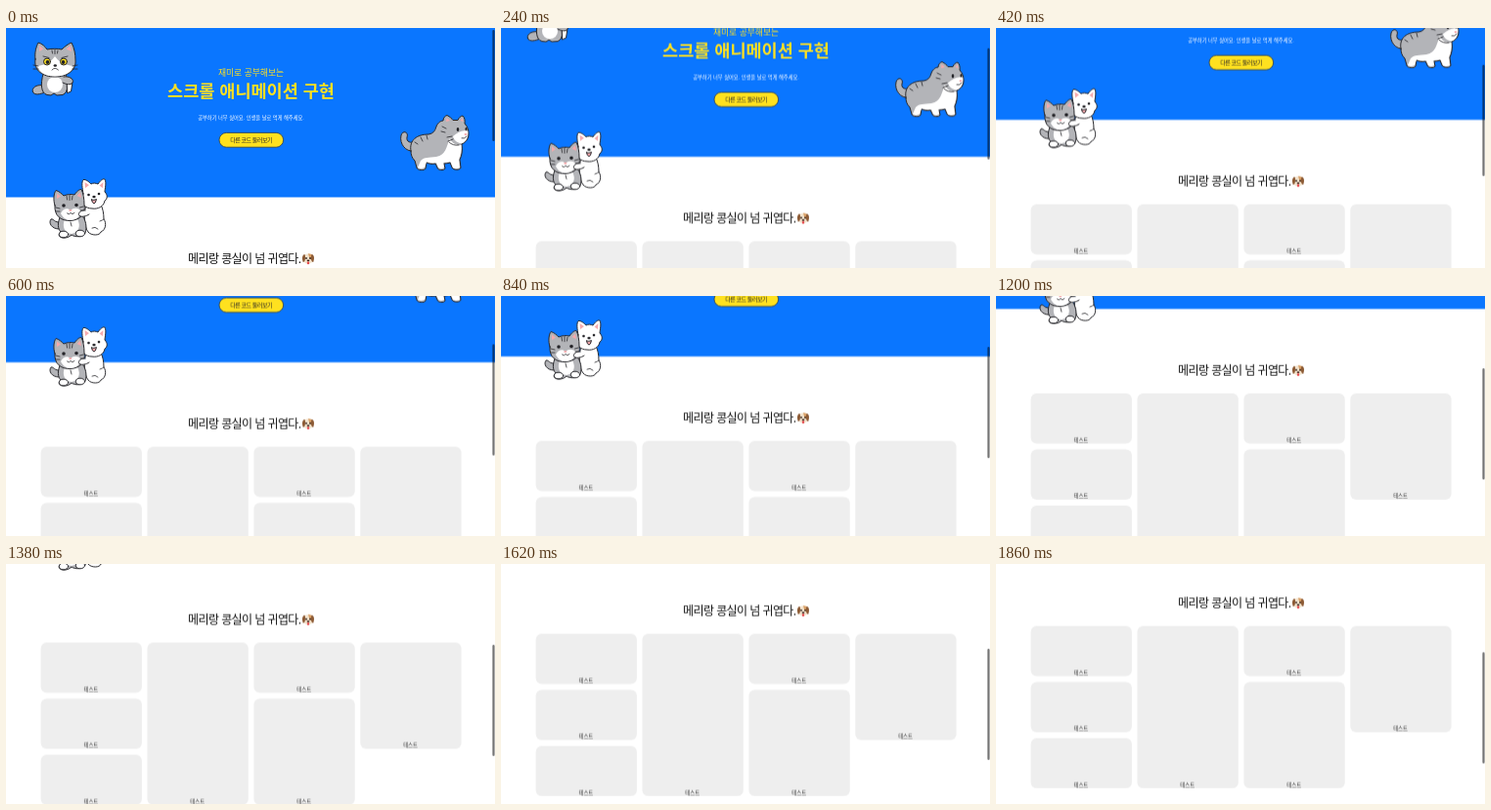
Recreate the animation shown at these times as an HTML page. Size 500 by 246 pixels, loop 2.04 s.

```html
<!DOCTYPE html>
<html lang="ko">
<head>
<meta charset="utf-8">
<title>스크롤 애니메이션 구현</title>
<style>
  html, body { margin: 0; width: 100%; height: 100%; overflow: hidden; background: #fff; }
  svg { display: block; }
  text { font-family: "Noto Sans CJK KR", "Noto Sans CJK", "Noto Sans CJK JP", sans-serif; text-anchor: middle; }
  .ink { stroke: #27272b; stroke-width: 1; stroke-linejoin: round; stroke-linecap: round; }
  .line { fill: none; stroke-width: .8; }
  .gray { fill: #b3b4b8; }
  .dark { fill: #8f9197; }
  .white { fill: #fff; }
  .black { fill: #222226; }
  .pink { fill: #f5a9ad; }
  .yellow { fill: #ffe11f; }
</style>
</head>
<body>
<svg width="500" height="246" viewBox="0 0 500 246">
  <g id="page">
    <rect width="500" height="173.5" fill="#0a76ff"/>
    <text class="yellow" x="250.5" y="49.3" font-size="8.8" font-weight="500">재미로 공부해보는</text>
    <text class="yellow" x="250.5" y="70.8" font-size="17.5" font-weight="900">스크롤 애니메이션 구현</text>
    <text class="white" x="250.5" y="93.6" font-size="5.27" font-weight="500">공부하기 너무 싫어요. 인생을 날로 먹게 해주세요.</text>
    <rect class="yellow" x="218" y="107.4" width="65.6" height="14.8" rx="7.4" stroke="#2b3a4c" stroke-width=".8"/>
    <text class="black" x="250.6" y="117" font-size="6" font-weight="500" letter-spacing="-.46">다른 코드 둘러보기</text>

    <text fill="#111" x="243.8" y="240.6" font-size="12" font-weight="500" letter-spacing="-.6">메리랑 콩실이 넘 귀엽다.</text>
    <g id="puppy">
      <ellipse cx="309" cy="236.6" rx="5" ry="5.3" fill="#f3e3cd"/>
      <path d="M309 231.3C313 231 315 234 314 238C312 239 310 236 309 231.3Z" fill="#d9a066"/>
      <path d="M305.5 232C302.5 232.5 302.6 237 303.8 240C306 240 306.6 235 305.5 232ZM312.5 232C315.6 232.5 315.4 237 314.2 240C312 240 311.4 235 312.5 232Z" fill="#8c5a34"/>
      <circle cx="307" cy="236" r=".9" fill="#33221a"/>
      <circle cx="311" cy="236" r=".9" fill="#33221a"/>
      <ellipse cx="309" cy="238.3" rx="1.4" ry=".9" fill="#33221a"/>
      <ellipse cx="309" cy="240.8" rx="1.2" ry="1.5" fill="#e5484d"/>
    </g>
    <g id="cards"></g>
  </g>

  <g id="sulky">
    <path class="ink gray" d="M39 59C31 57 25 62 28 66.500C32 70 37 66 42 66Z"/>
    <path class="ink gray" d="M38 47C35 58 36 67 42 68.500L46 69L49 67L52 69L58 68.500C64 66 64 56 61 47Z"/>
    <ellipse class="white" cx="50" cy="58" rx="8" ry="8"/>
    <path class="ink white" d="M62.500 56L68 55L66.500 65L63 66.500Z"/>
    <path class="ink gray" d="M59 50C64 49 70 52 68 56C66 59 61 57.500 58 56"/>
    <path class="ink gray" d="M30 32C29 25 31 19 33 15C37 16 40 19 42 22C47 21 53 21 57 22C60 19 64 16 67 15C70 21 71 27 71 33C72 44 62 50 50 50C38 50 28 44 30 32Z"/>
    <path class="white" d="M32 39C40 38 46 35 50 29C54 35 60 38 69 39C66 47 58 49.400 50 49.400C42 49.400 35 47 32 39Z"/>
    <path class="pink" d="M34 18L34 24L38.500 21.500ZM66 18L67 24L61.500 21.500Z"/>
    <path class="ink line" d="M47 23L47.500 26M50 22.500V26.500M53 23L52.500 26M38 29L44 30.500M63 29L57 30.500M47 43Q50 39.500 53.500 43M28 38L33 39M28 42L33 42M73 38L68 39M73 42L68 42"/>
    <circle class="ink yellow" cx="42" cy="34.500" r="3.500"/>
    <circle class="ink yellow" cx="59" cy="34.500" r="3.500"/>
    <circle class="black" cx="42.500" cy="35" r="1.900"/>
    <circle class="black" cx="58.500" cy="35" r="1.900"/>
    <ellipse class="black" cx="50.300" cy="38.500" rx="1.700" ry="1.200"/>
  </g>

  <g id="walker">
    <path class="ink gray" d="M416 126C409 127 402 119 404 110C406 104 412 107 410 112C409 117 414 118 418 117Z"/>
    <path class="ink gray" d="M414 126C412 115 420 109 432 109C438 108 439 104 440 101C441 98 444 95 447 95C447 92 449 90 451 89.500C454 91 456 93 457 94.500L462 94.500C463 92 465 90 467 90C469 92 469.500 95 469 98C472 101 473 105 473 108C473.500 114 469 118 466 119C467 126 466 131 464 135L465 143C465 146 457 146 456 143L454 138C451 139 449 139 448 139L449 144C448 146.500 441 146 441 143L439 139C435 140 432 139 430 138L429 144C428 146.500 420 146 420 143L418 136C415 133 414 130 414 126Z"/>
    <path class="white" d="M465.500 120C460 121 455 117 454 113C450 122 450 130 440 132C432 133 428 132 424 136L421 143Q424 145 428 143L430 137Q435 139 440 138L442 143Q445 145 448 143L447 138L454.500 137L457 143Q460 145 464 143L463 135C465 130 466 125 465.500 120Z"/>
    <path class="white" d="M472.300 106C467 104 462 107 457 111C458 116 463 118.500 466 118C470 117 472.500 112 472.300 106Z"/>
    <path class="pink" d="M450.500 92L450 96L454 95ZM466.500 92L464.500 95L467.500 96Z"/>
    <path class="ink line" d="M430 110L431 114M424 112L426 116M418 117L421 119M446 101L450 103M445 106L449 107M466 113Q469 114 471 111M456 111L451 112M457 114L452 116M463 120Q457 121 453 117"/>
    <ellipse class="black" cx="462" cy="104" rx="1.300" ry="1.900"/>
    <ellipse class="black" cx="470.500" cy="103.500" rx="1" ry="1.700"/>
    <ellipse class="pink" cx="470" cy="109" rx="1.500" ry="1"/>
  </g>

  <g id="duo">
    <path class="ink white" d="M82 181C79 192 80 204 84 209C87 213 96 213 97 209C102 207 103 200 100 196C100 190 99 185 97 181Z"/>
    <path class="ink white" d="M79 170C78 164 77 158 79 155.500C82 155 85 158 87 160C89 158.500 92 159 94 160C96 157 99 154 101 155C103 159 101 165 101 168C104 171 104 175 101 177C100 183 94 186 88 185C81 185 77 180 78 176C75 174 76 171 79 170Z"/>
    <path class="pink" d="M80.500 158L81 164L85 161ZM99.500 158L95.500 161.500L99 164Z"/>
    <circle class="black" cx="84.500" cy="171" r="1.300"/>
    <circle class="black" cx="95" cy="170" r="1.300"/>
    <ellipse class="black" cx="90" cy="173" rx="1.700" ry="1.200"/>
    <path class="ink pink" stroke-width=".8" d="M87.500 176Q90 177 92.500 175.500Q91.500 180 90 180Q88 179.500 87.500 176Z"/>
    <path class="ink gray" d="M54 206C47 206 43 200 46 196C49 195 49 200 56 199Z"/>
    <path class="ink gray" d="M56 192C52 200 53 206 56 209C52 212 55 216 61 215C64 214.500 66 213 67 212C71 215 80 214 81 210C83 204 82 197 77 191Z"/>
    <path class="white" d="M60 196C57 204 60 210 67 211C74 210 77 203 73 196Z"/>
    <ellipse class="ink white" cx="59" cy="211.500" rx="4.600" ry="3.300"/>
    <ellipse class="ink white" cx="76" cy="210.500" rx="4.600" ry="3.300"/>
    <path class="ink gray" d="M50 182C48 176 49 169 51 166.500C54 167 57 170 59 172C62 170.500 67 170 70 171C72 168 75 165 77 165.500C79 169 80 175 80 181C82 191 75 197 66 197.500C56 198 49 192 50 182Z"/>
    <path class="white" d="M56 190C58 185 63 184 66 187C69 184 74 184 77 188C75 194 71 196.800 66 197C61 197 58 194 56 190Z"/>
    <path class="pink" d="M52 169.500L52 175L56 172.500ZM76 168.500L72.500 172L77 174Z"/>
    <path class="ink line" d="M62 172L62.500 176M65 171.500V176.500M68 172L67.500 176M51 184L55 185M51 188L55 188M79 183L75.500 184M79.500 187L76 187M62.500 190Q64.500 192 66 189.500Q68 192 70 189.500"/>
    <circle class="black" cx="59" cy="182" r="1.800"/>
    <circle class="black" cx="72" cy="181.500" r="1.800"/>
    <ellipse class="pink" cx="65.800" cy="187" rx="1.600" ry="1.100"/>
    <path class="ink white" d="M80 187C76 187 73 190 75 192.500C78 194 82 193 85 191"/>
    <path class="ink line" d="M66 199L67 203M88 205Q91 203 94 206M96 198Q99 197 100 196"/>
  </g>

  <rect id="thumb" x="497.400" y="2" width="2.200" height="114" rx="1.100" fill="#000" fill-opacity=".55"/>
</svg>
<script>
const STEP = 60, LOOP = 2040, LAST = 31;

// [column, row, row span]
const cards = [[0, 0, 1], [0, 1, 1], [0, 2, 1], [1, 0, 3], [2, 0, 1], [2, 1, 2], [3, 0, 2]];
document.getElementById('cards').innerHTML = cards.map(([col, row, span]) => {
  const x = 35.6 + col * 108.9, y = 260 + row * 57.5, h = span * 57.5 - 6;
  return `<rect x="${x}" y="${y}" width="103.3" height="${h}" rx="6" fill="#eee"/>` +
    `<text x="${x + 51.3}" y="${y + h - 1.6}" font-size="5.4" fill="#333">테스트</text>`;
}).join('');

// [step, scroll offset]: three wheel bursts
const keys = [[0, 0], [4, 41.5], [10, 105.5], [14, 111.5], [18, 144], [23, 179.5], [27, 188.5], [31, 196.5]];
const rise = keys.slice(1).map(([x, y], i) => (y - keys[i][1]) / (x - keys[i][0]));
const slope = keys.map((_, i) => {
  const a = rise[i - 1], b = rise[i];
  if (a === undefined) return b;
  return b === undefined ? 1 : 2 * a * b / (a + b);
});

// Smooth monotone curve through the keys
function scrollAt(step) {
  const i = Math.min(keys.length - 2, keys.findLastIndex(k => k[0] <= step));
  const [x0, y0] = keys[i], [x1, y1] = keys[i + 1];
  const w = x1 - x0, u = (step - x0) / w, v = 1 - u;
  return y0 * v * v * (1 + 2 * u) + y1 * u * u * (3 - 2 * u) +
    w * u * v * (slope[i] * v - slope[i + 1] * u);
}

function follow(id, rate) {
  const frames = [];
  for (let i = 0; i <= LAST; i++) {
    frames.push({
      offset: i * STEP / LOOP,
      transform: `translateY(${(rate * scrollAt(i)).toFixed(2)}px)`,
      easing: 'steps(1, end)'
    });
  }
  frames.push({ offset: 1, transform: frames[LAST].transform });
  document.getElementById(id).animate(frames, { duration: LOOP, iterations: Infinity });
}

follow('page', -1);
follow('sulky', -1.32);
follow('walker', -1.32);
follow('duo', -1.165);
follow('thumb', .45);
</script>
</body>
</html>
```
